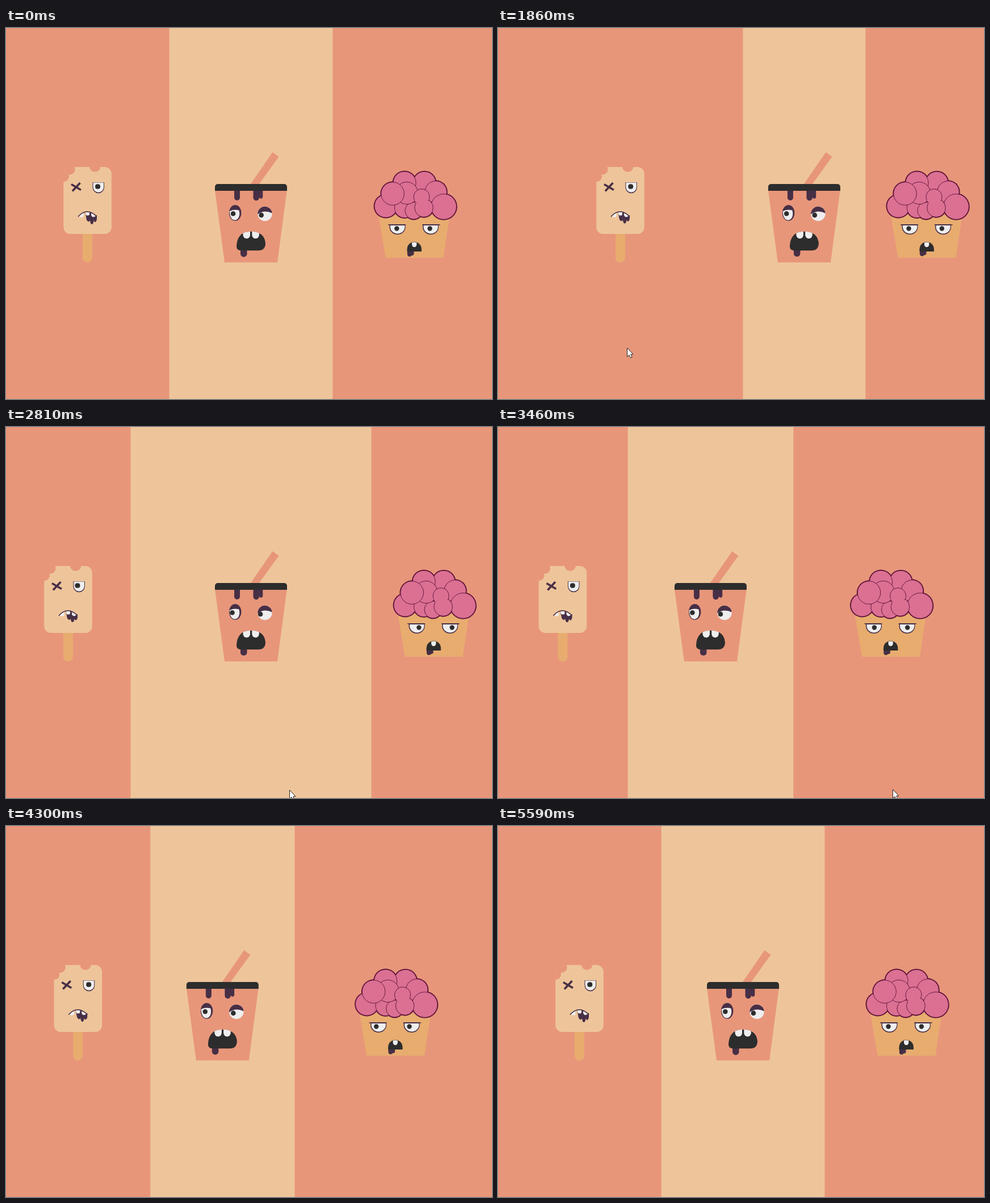
Animation of 856x654 px, one loop 5.82 s. Source, as an HTML page:

```html
<!DOCTYPE html>
<html lang="en">
<head>
<meta charset="utf-8">
<title>Zombie snacks</title>
<style>
  html, body { margin: 0; width: 100%; height: 100%; overflow: hidden; background: #e8967a; }
  svg { display: block; }
  .salmon { fill: #e8967a; } .cream { fill: #eec59a; } .wafer { fill: #e8ac6f; }
  .dark { fill: #2d2d2d; } .plum { fill: #472f46; } .white { fill: #eee; }
  .line { fill: none; stroke: #472f46; }
</style>
</head>
<body>
<svg width="856" height="654" viewBox="0 0 856 654">
  <rect id="band" class="cream" height="654"/>

  <g class="snack">
    <path class="wafer" d="M135 360h17v45a8.5 8.5 0 0 1-17 0z"/>
    <rect class="cream" x="101.3" y="245" width="84.5" height="118" rx="12"/>
    <g class="salmon">
      <circle cx="112" cy="249" r="9.7"/><circle cx="102" cy="262" r="9"/><circle cx="156.7" cy="244" r="9.8"/>
    </g>
    <path class="line" stroke-width="3.6" d="M115 275.5L132 285.5M117 287.5L130.500 273"/>
    <path class="plum" d="M152.500 272h20.500v9a10 10 0 0 1-20.500 0z"/>
    <path class="white" d="M153.500 272.500h18.500v8a9.200 9.200 0 0 1-18.500 0z"/>
    <rect class="dark look" data-reach="-2.5" x="158" y="275.200" width="9" height="8.600" rx="4"/>
    <path class="plum" d="M139 325Q153 323 160 333L158 336H142z"/>
    <path class="plum drool" data-top="330" data-size="16" data-swing="1"
      d="M141 330H160V337Q159 342 157 342Q155 342 154.500 339Q154 346 151.200 346Q148.500 346 148 339Q147 342 144.500 341Q141 340 141 330z"/>
    <g class="white">
      <path d="M128.500 331Q131 327 135.500 326.500L137 330Q136 334 132.500 333.700Q130 333.500 128.500 331z"/>
      <path d="M139.500 325H147V329Q146 331 143 330.500Q140 330.500 139.500 325z"/>
      <path d="M150 326.500Q155 327 158 331.500Q155 334 152.500 333Q149.500 331.500 150 326.500z"/>
    </g>
    <path class="line" stroke-width="1.6" d="M127 332.500Q143 315 160 332.500"/>
  </g>

  <g class="snack">
    <path class="salmon" d="M429.500 277L469.500 219L480.500 227L444.500 277z"/>
    <path class="salmon" d="M368 286H494.800L478 413.300H385z"/>
    <path class="dark" d="M368 287V280a5 5 0 0 1 5-5H490a5 5 0 0 1 5 5V287z"/>
    <path class="plum" d="M402 287h10v12a5 5 0 0 1-10 0zM435.500 287h10.500v12a5.200 5.200 0 0 1-10.500 0zM446 287h6.300v10.500a3.100 3.100 0 0 1-6.300 0z"/>
    <ellipse class="plum" cx="403.700" cy="326" rx="10.700" ry="14"/>
    <path class="white" d="M393.800 323Q402 319 410.500 321.500Q413 331 408 336.500Q403 341 398 336.500Q393.500 331 393.800 323z"/>
    <circle class="white" cx="456" cy="327.500" r="12.700"/>
    <path class="plum" d="M443.300 328.500A12.700 12.700 0 0 1 468.700 326.500Q455 319.500 443.300 328.500z"/>
    <g class="dark look" data-reach="-2.5">
      <circle cx="401" cy="327.300" r="4.300"/><circle cx="450.600" cy="329.900" r="4.300"/>
    </g>
    <path class="plum drool" data-top="390" data-size="14" data-swing=".5" d="M413 390h11.500v8a5.700 5.700 0 0 1-11.500 0z"/>
    <path class="dark" d="M406 385Q407 359 431 358.700Q455 359 457 379Q457 392.300 444 392.300H414Q406 392.300 406 385z"/>
    <path class="white" d="M417.500 361.500Q423 359 430 358.800V365a6.200 6.200 0 0 1-12.500 0zM433.300 358.800Q440 359 445.800 361.500V365a6.200 6.200 0 0 1-12.500 0z"/>
  </g>

  <g class="snack">
    <path class="wafer" d="M656 330H781.500L770.500 405H668.500z"/>
    <g id="brain"></g>
    <path class="plum" d="M675.500 347h28v4a13.800 13 0 0 1-28 0zM734 347h28v4a13.800 13 0 0 1-28 0z"/>
    <path class="white" d="M677 348h25.300v3a12.500 11.300 0 0 1-25.300 0zM735.500 348h25.300v3a12.500 11.300 0 0 1-25.300 0z"/>
    <path class="line" stroke-width="1.600" d="M673 346.800H704M733 346.800H764.500"/>
    <g class="dark look" data-reach="8">
      <circle cx="685.300" cy="353.500" r="4.200"/><circle cx="743.600" cy="353.500" r="4.200"/>
    </g>
    <path class="plum drool" data-top="390" data-size="13" data-swing=".5"
      d="M706.800 390H718.500V398.500Q717.500 401.500 714.500 401Q713 403 710.500 403Q706.800 402.500 706.800 398z"/>
    <path class="dark" d="M706.500 394V390a12.700 13 0 0 1 25.400 0V394z"/>
    <path class="white" d="M715 378.200Q719 376.700 723.300 378.200V382a4.100 4.100 0 0 1-8.300 0z"/>
  </g>

  <path id="cursor" d="M0 0V15.500L3.600 12.300L6 17.500L8.600 16.300L6.300 11.200H10.500z" fill="#fff" stroke="#222" stroke-width="1"/>
</svg>

<script>
const LOOP = 5820, STEP = 400 / 3, LAST_STEP = 42, PAGE_WIDTH = 863;

// Lobes from back to front: x, y, radius.
const lobes = [
  [737, 273, 21.3], [702, 273, 21.5], [669, 314, 21.5], [757, 289, 20.7], [771, 315, 23.8],
  [702, 317, 19], [718, 322, 16.5], [706, 291, 21], [681, 292, 21.7], [736, 317, 17.7]
];
const circle = ([x, y, r], inset, paint) => `<circle cx="${x}" cy="${y}" r="${r - inset}" ${paint}/>`;
const pink = 'fill="#db7093"', thin = 'stroke="#5c1137" stroke-width=".9"';
document.getElementById('brain').innerHTML =
  lobes.map(lobe => circle(lobe, 0, 'fill="#5c1137"')).join('') +
  lobes.map(lobe => circle(lobe, 1.4, `${pink} ${thin}`)).join('') +
  circle([732, 298, 14], 0, pink) +
  `<path fill="none" ${thin} d="M719.500 304A14 14 0 1 1 744 305"/>`;

// Flex weight changes per panel: start, duration, new weight, easing bias.
const hovers = [
  [[1190, 500, 2], [2271, 400, 1, .7]],
  [[2290, 655, 2, .7], [3074, 600, 1]],
  [[3117, 700, 2], [3995, 476, 1]]
];
// Pointer path: time, x, y.
const pointer = [
  [1195, 238, 645], [1333, 229, 576], [1867, 227.5, 564], [2000, 229, 575], [2133, 237, 632],
  [2267, 425, 642], [2400, 470, 641], [2800, 499.5, 640], [3067, 620, 640], [3467, 695.5, 639],
  [3867, 695, 645], [3990, 710, 658]
];

const snacks = [...document.querySelectorAll('.snack')];
const looks = [...document.querySelectorAll('.look')];
const drools = [...document.querySelectorAll('.drool')];
const band = document.getElementById('band');
const cursor = document.getElementById('cursor');

const clamp = x => Math.min(1, Math.max(0, x));
const smooth = x => x * x * (3 - 2 * x);
const mix = (a, b, p) => a + (b - a) * p;
const move = (node, x, y = 0) => node.setAttribute('transform', `translate(${x} ${y})`);

const weightAt = (track, t) => track.reduce((weight, [start, duration, goal, bias = 1]) =>
  mix(weight, goal, smooth(clamp((t - start) / duration) ** bias)), 1);

function drawPanels(t) {
  const weights = hovers.map(track => weightAt(track, t));
  const total = weights.reduce((a, b) => a + b);
  let left = 0;
  weights.forEach((weight, i) => {
    const width = PAGE_WIDTH * weight / total;
    move(snacks[i], left + width / 2 - PAGE_WIDTH * (i + .5) / 3);
    if (i === 1) {
      band.setAttribute('x', left);
      band.setAttribute('width', width);
    }
    left += width;
  });
}

function drawFaces(t) {
  const glance = ((1 + Math.cos(2 * Math.PI * (t - 2850) / 3740)) / 2) ** 1.6;
  looks.forEach(node => move(node, node.dataset.reach * glance));
  const drip = Math.cos(2 * Math.PI * t / LOOP) - 1;
  drools.forEach(node => {
    const { top, size, swing } = node.dataset;
    const stretch = 1 + swing * drip / size;
    node.setAttribute('transform', `translate(0 ${top * (1 - stretch)}) scale(1 ${stretch})`);
  });
}

function drawCursor(t) {
  const next = pointer.findIndex(([time]) => time > t);
  cursor.style.display = next > 0 ? '' : 'none';
  if (next < 1) return;
  const [t0, x0, y0] = pointer[next - 1], [t1, x1, y1] = pointer[next];
  const p = (t - t0) / (t1 - t0);
  move(cursor, mix(x0, x1, p), mix(y0, y1, p));
}

// The picture advances in steps of 7.5 per second.
function render(now) {
  const t = Math.min(LAST_STEP, Math.floor((now % LOOP + 14) / STEP)) * STEP;
  drawPanels(t);
  drawFaces(t);
  drawCursor(t);
}

let begin;
function tick(now) {
  begin ??= now;
  render(now - begin);
  requestAnimationFrame(tick);
}
render(0);
requestAnimationFrame(tick);
</script>
</body>
</html>
```
